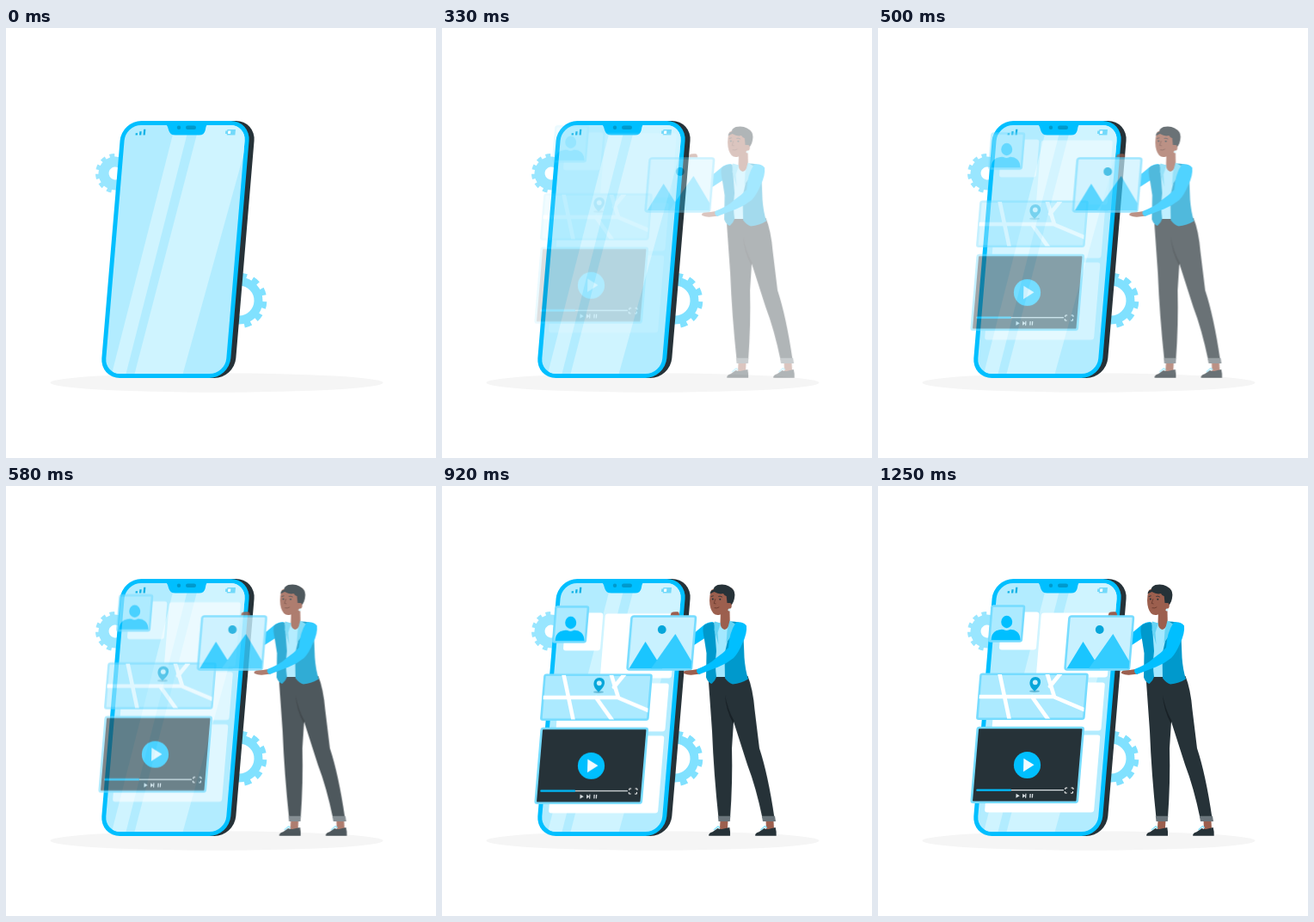
Animation of 500x500 px, one loop 1.29 s. Source, as an HTML page:

```html
<!DOCTYPE html>
<html lang="en">
<head>
<meta charset="utf-8">
<title>Phone interface</title>
<style>
  html, body { margin: 0; width: 100%; height: 100%; overflow: hidden; background: #fff; }
  svg { display: block; width: 100%; height: 100%; }
  .cards, .person { animation: 1290ms infinite both; }
  .cards { animation-name: drop; }
  .person { animation-name: slide; }
  @keyframes drop {
    0%, 7% { opacity: 0; transform: translateY(-30px); animation-timing-function: cubic-bezier(.36, -.01, .5, 1.38); }
    96.9%, 100% { opacity: 1; transform: none; }
  }
  @keyframes slide {
    0% { opacity: 0; transform: translateX(30px); animation-timing-function: cubic-bezier(.31, 0, .38, 1.4); }
    96.9%, 100% { opacity: 1; transform: none; }
  }
  .card { fill: #aceaff; stroke: #76dcff; stroke-width: 2.6; }
  .photo { fill: #c8f1ff; }
  .video { fill: #263238; }
  .dark { fill: #263238; }
  .blue { fill: #00bfff; }
  .deep { fill: #0099cc; }
  .mid { fill: #06a6da; }
  .pale { fill: #b2ecff; }
  .shirt { fill: #a3e8ff; }
  .skin { fill: #9c5f4e; }
  .white { fill: #fff; }
  .cuff { fill: #69747a; }
  .line { fill: none; stroke-linecap: round; stroke-linejoin: round; }
</style>
</head>
<body>
<svg viewBox="0 0 500 500">
  <defs>
    <clipPath id="screen">
      <rect x="5" y="5" width="140" height="289" rx="18" transform="translate(134.5 108) skewX(-4.8)"/>
    </clipPath>
    <clipPath id="map">
      <rect x="1.5" y="1.5" width="123" height="51.5" rx="2" transform="translate(118.5 217.500) skewX(-4.8)"/>
    </clipPath>
  </defs>

  <ellipse cx="245" cy="412.5" rx="193.5" ry="11.2" fill="#f5f5f5"/>

  <!-- gears -->
  <g fill="none" stroke="#99e6ff" transform="translate(127 169) rotate(12)">
    <circle r="13.5" stroke-width="12"/>
    <circle r="20.8" stroke-width="4.4" pathLength="240" stroke-dasharray="10.5 9.5"/>
  </g>
  <g fill="none" stroke="#80e1ff" transform="translate(271 317) rotate(2)">
    <circle r="22.5" stroke-width="10"/>
    <circle r="29.5" stroke-width="5.6" pathLength="240" stroke-dasharray="10.5 9.5"/>
  </g>

  <!-- phone -->
  <g transform="translate(134.5 108) skewX(-4.8)">
    <rect class="dark" x="7" width="149" height="299" rx="23"/>
    <rect class="blue" width="150" height="299" rx="23"/>
  </g>
  <g clip-path="url(#screen)">
    <rect class="pale" x="100" y="100" width="200" height="310"/>
    <g fill="#cff4ff">
      <path d="M198 108h16.500L138 408h-16.500z"/>
      <path d="M226 108H300V112L286 112 204 408H148z"/>
    </g>
  </g>
  <path class="blue" d="M184 111h52q-3 1-3.500 4l-.8 4q-1.200 5.500-7 5.500h-28q-6 0-7.500-5.500l-1.200-4q-.8-3-4-4z"/>
  <circle class="deep" cx="201" cy="115.700" r="2.200"/>
  <rect class="deep" x="209" y="113.500" width="12" height="4.500" rx="2.250"/>
  <path fill="#12b2e6" d="M150.700 122.200h2.400l-.2 2.300h-2.400zM155.400 120.300h2.300l-.4 4.200h-2.300zM160.100 117.800h2.300l-.6 6.700h-2.300z"/>
  <path fill="#72d9fa" d="M257.500 118h9.500l-.6 6.500h-9.500l-.2-1.500h-1.700l.3-3.500h1.800z"/>
  <path class="white" d="M258.300 119.600h3l-.3 3.300h-3z"/>

  <!-- screen content -->
  <g class="cards">
    <g class="white">
      <rect width="43" height="44" rx="3" transform="translate(144.500 146.500) skewX(-4.8)"/>
      <rect width="83" height="75" rx="3" transform="translate(190 147.500) skewX(-4.8)"/>
      <rect width="127" height="56" rx="3" transform="translate(137 228.500) skewX(-4.8)"/>
      <rect width="127" height="90" rx="3" transform="translate(131.500 289.500) skewX(-4.8)"/>
    </g>

    <rect class="card" x="1.200" y="1.200" width="37.500" height="41" rx="2" transform="translate(131.500 138.300) skewX(-4.8)"/>
    <ellipse class="blue" cx="149.700" cy="158" rx="6.500" ry="7.200"/>
    <path class="blue" d="M131.500 179.300q.3-8 6-11 5-2.300 8.500-1.400 3.300 2 7 0 5.500-.4 9 2.800 3.300 3 3.600 9.600z"/>

    <rect class="card" x="1.200" y="1.200" width="124" height="52" rx="2" transform="translate(118.500 217.500) skewX(-4.8)"/>
    <g clip-path="url(#map)" class="line" stroke="#fff" stroke-width="4.600">
      <path d="M115 245H204L244 262M141 216L153 273M179 245L199 273M196 216L205 245M213 217L200 233"/>
    </g>
    <ellipse cx="182" cy="238.700" rx="6" ry="1.200" fill="#66b9d6"/>
    <path class="mid" d="M182 238.700q-6-5.500-5.600-10 .8-6.600 6.700-6.700 6 .2 6 6.200-.5 4.800-7.100 10.500z"/>
    <circle class="photo" cx="182.800" cy="228.300" r="2.900"/>

    <rect class="card video" x="1.200" y="1.200" width="123" height="86.800" rx="2" transform="translate(114.800 279.800) skewX(-4.8)"/>
    <circle class="blue" cx="173.500" cy="324.500" r="15.600"/>
    <path fill="#f0fbff" d="M169.400 316.800L181.500 324.300 169 332.200z"/>
    <path class="line" stroke="#dbe1e4" stroke-width="1.200" d="M155 353.700H215.500"/>
    <path class="line" stroke="#00bfff" stroke-width="2.200" d="M115.300 353.700H154"/>
    <path class="line" stroke="#fff" stroke-width="1" d="M217.800 352.500v-1.500h2M225 351h2v1.500M226.500 355.500v1.600h-2M219.300 357h-2v-1.500"/>
    <path fill="#dbe1e4" d="M160.600 357.700l4.200 2.500-4.400 2.500zM168.200 357.700l3.200 2.500-3.400 2.500zM171.300 357.700h1.200l-.3 5h-1.200zM176.500 357.900h1.300l-.3 4.700h-1.300zM179 357.900h1.300l-.3 4.700h-1.300z"/>
  </g>

  <g class="person">
    <!-- far arm -->
    <path class="blue" d="M317 158q-6 0-11 4l-18 15 4 10 20-13z"/>
    <path class="skin" d="M267.500 151l1-3.500q2-1.700 7.500-1.200 2 .7 2 4.700z"/>

    <!-- shoes and ankles -->
    <path class="skin" d="M325.500 389h9l-.6 10h-9zM378.500 389h9l.5 10h-9z"/>
    <path class="dark" d="M312.200 406.800q-.5-3.300 4.300-4.600l6-4.200q2.500 1.500 6 .7l7.800-1.700q1 4.500.7 9.800zM366.200 406.800q-.5-3.300 4.300-4.600l6-4.200q2.500 1.500 6 .7l7.200-1.700q1.300 4.500 1 9.800z"/>
    <path class="line" stroke="#8fe4ff" stroke-width="1.600" d="M318.500 399.500l4.500-3.700 1.600 1.600M373 399.500l4.500-4 1.600 1.600"/>

    <!-- trousers -->
    <path class="dark" d="M311.500 221H357.500Q363.500 236 365.500 260L371 305Q381 335 388.500 386H374.500Q367 350 357 324L341 274 339 305Q340 345 337 386H323.500Q318 335 316 285z"/>
    <path fill="#182126" d="M331 243Q332 260 340.500 276L341.500 273Q334 260 331 243z"/>
    <path class="cuff" d="M322.800 383.800H337.300L336.800 390H323.500zM373.800 383.800H389L390 390H375z"/>

    <!-- torso -->
    <path class="shirt" d="M316 162L326 159 337 160 341 185 334 222H317z"/>
    <path class="skin" d="M326 145h10.500l.3 14q-2 7-6.500 8-4-1.200-4.800-7z"/>
    <path class="deep" d="M318.500 158.500q-9 .5-12.500 4-1.500 4 1 16l2.500 16-.5 28q2 6 6.500 7.500 4.500-4 5.500-8-2-14 0-30z"/>
    <path class="deep" d="M338 157.500q10 0 14 4l1.500 38q1 14 4.500 25-8 5-18 6-5-1.500-9-7l-.5-28 5-22z"/>
    <path fill="#66d4f5" d="M319 157.500l7 2-3.500 11 1 14-5-17zM336.500 156.500l6.500 4-4 13-6.500 9 1-14z"/>

    <!-- picture card -->
    <rect class="card photo" x="1.200" y="1.200" width="74.500" height="62" rx="2.500" transform="translate(221.500 150.300) skewX(-4.8)"/>
    <circle class="mid" cx="257.700" cy="167" r="4.900"/>
    <path fill="#1ac5ff" d="M219.500 212.300L238.500 181 258 212.300z"/>
    <path fill="#33ccff" d="M245 212.300L273.300 172 292.300 204 291.700 212.300z"/>

    <!-- near arm -->
    <path class="skin" d="M302 212.500l-9 1.500-8 .8q-3 1.500-1.700 3.200 4 2 8.500 1.800l10.500-1.300z"/>
    <path class="blue" d="M344 158.500q8-1 12 4 1 9-5 21-4 10-10 16.500-8 6.500-18 10.500l-22 8.500q-4-2-2.500-6 15-6 21.500-12.500 9-6 15-12.500 1-18 9-29.500z"/>

    <!-- head -->
    <path class="skin" d="M315 121q-2 6-2 12 .2 10 4.500 15 3 3 8 1.500 5-1 9-4.500l6-11-1-15-14-3z"/>
    <path class="dark" d="M313.500 125.500q.5-4.500 4-4.500 0-4 5-6 8-1.500 13 1.500 8 4 6.700 12-.3 6-4.200 10.500-1-3.500-4.500-3l-.8-8q-2 .2-3.700-3-5 1.500-10.500-2-2 .5-5 2.500z"/>
    <ellipse class="skin" cx="336.300" cy="139.300" rx="2.400" ry="3.400"/>
    <circle cx="336" cy="144" r="1.500" fill="#d5f5ff"/>
    <circle class="dark" cx="316.800" cy="131.500" r="1"/>
    <circle class="dark" cx="325.300" cy="131.700" r="1"/>
    <path class="line" stroke="#263238" stroke-width=".8" d="M315 128.500l2.300-.7M323.700 128.300q2-.8 3.800.6"/>
    <path class="line" stroke="#64372b" stroke-width=".8" d="M319.800 131.500l-1.600 5 2 .4M319 141.800q3 .8 5-.8"/>
  </g>
</svg>
</body>
</html>
```
